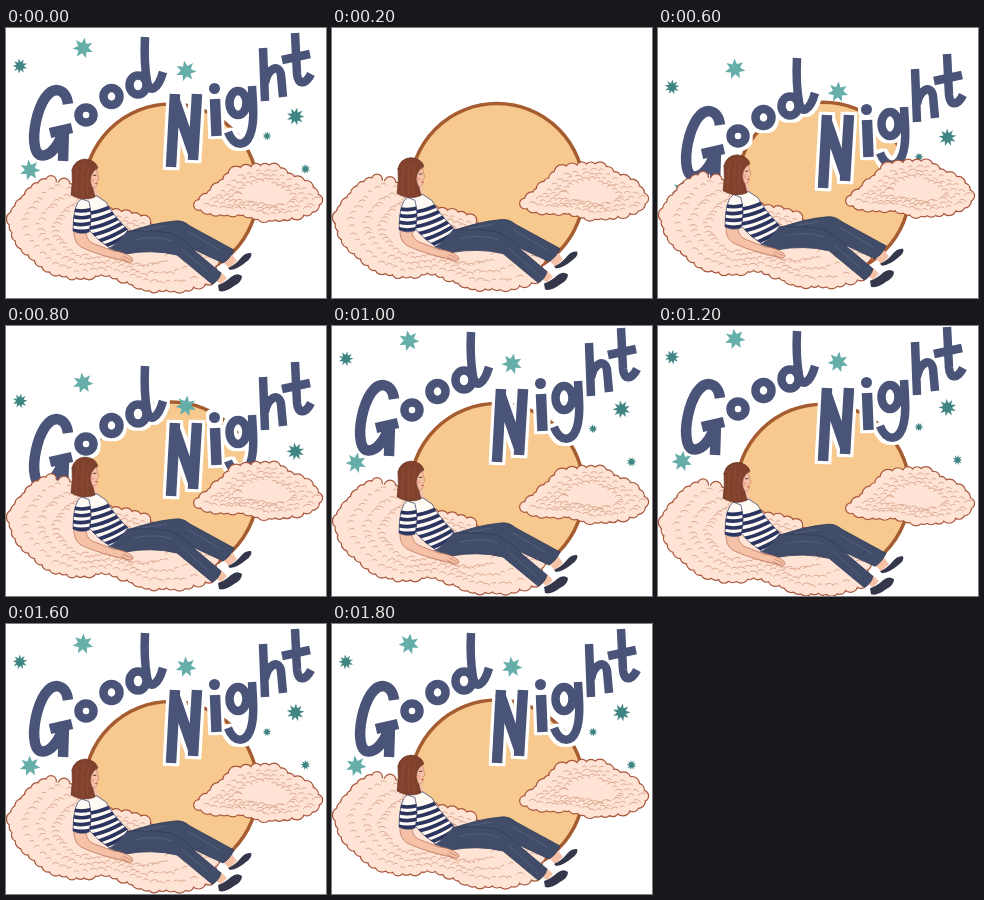
Recreate the animation shown at these times as an HTML page. Size 320 by 270 pixels, loop 2 s.

```html
<!DOCTYPE html>
<html lang="en">
<head>
<meta charset="utf-8">
<title>Good Night</title>
<style>
html, body { margin: 0; width: 100%; height: 100%; overflow: hidden; background: #fff; }
svg { display: block; width: 100vw; height: 100vh; }
path { stroke-linecap: round; stroke-linejoin: round; }
#words path { stroke-linecap: butt; }
</style>
</head>
<body>
<svg id="stage" viewBox="0 0 320 270" role="img" aria-label="Good Night"></svg>
<script>
const stage = document.getElementById('stage');
const shape = (d, fill, extra = '') => `<path d="${d}" fill="${fill}" ${extra}/>`;
const line = (d, color, width) => shape(d, 'none', `stroke="${color}" stroke-width="${width}"`);
const dot = (x, y, r, extra = '') => `<circle cx="${x}" cy="${y}" r="${r}" ${extra}/>`;
const ring = (x, y, rx, ry) =>
  `M${x - rx} ${y}a${rx} ${ry} 0 1 1 ${2 * rx} 0a${rx} ${ry} 0 1 1 ${-2 * rx} 0Z`;

function random(seed) {
  return () => (seed = seed * 16807 % 2147483647) / 2147483647;
}

// Centre lines of the hand lettering, grouped by pen width.
const thick = 'M62 76C60 61 48 57 39 70C31 82 26 105 29 119C32 132 42 128 48 121C54 114 56 108 57 101' +
  'M44 105L66 100M58 100L57 133M169 66L165 139M168 70L188 128M191 66L187 132M209 71L210.500 108';
const thin = ring(80, 87, 7.5, 7.5) + ring(105.5, 68.5, 8, 8.5) + ring(132, 57, 8.5, 9.5) +
  'M139 9C138 30 139 42 141 53C143 66 152 62 157 44' +
  ring(232, 75, 8.5, 12) + 'M246 58C247 76 249 94 244 107C239 119 228 119 222 104' +
  'M257 20L259 73M259 55C262 40 273 35 275 47L277 69' +
  'M289 5L291 46C292 58 300 56 305 46M276 32L304 26';
const lettering = color => line(thick, color, 10.5) + line(thin, color, 8.5) + dot(208.5, 60.5, 5.5, `fill="${color}"`);

// A filled outline with puffs strung along it and loose curls inside.
function cloud(outline, seed) {
  const rnd = random(seed), pts = outline.split(' ').map(p => p.split(',').map(Number));
  const cx = pts.reduce((s, p) => s + p[0], 0) / pts.length;
  const cy = pts.reduce((s, p) => s + p[1], 0) / pts.length;
  let puffs = '', curls = '';
  pts.forEach(([x, y], i) => {
    const [u, v] = pts[(i + 1) % pts.length];
    const n = Math.max(1, Math.round(Math.hypot(u - x, v - y) / 9));
    for (let k = 0; k < n; k++) {
      const px = x + (u - x) * k / n, py = y + (v - y) * k / n, r = 4.8 + 2.6 * rnd();
      puffs += dot(px.toFixed(1), py.toFixed(1), r.toFixed(1));
      for (const depth of [.08, .25, .42]) {
        const s = 2.5 + 3 * rnd(), qx = px + (cx - px) * depth, qy = py + (cy - py) * depth;
        curls += `M${qx.toFixed(1)} ${qy.toFixed(1)}a${s.toFixed(1)} ${s.toFixed(1)} 0 0 1 ${(s * 1.5).toFixed(1)} ${(s * (rnd() - .5)).toFixed(1)}`;
      }
    }
  });
  return `<g fill="#ffe4d6" stroke="#a8553a" stroke-width="2.4">${puffs}</g>` +
    `<g fill="#ffe4d6">${puffs}<polygon points="${outline}"/></g>` + line(curls, '#d39a7e', .8);
}
const bank = '45,153 58,156 68,170 100,186 120,189 138,194 150,212 185,222 206,232 203,250 182,257 ' +
  '148,258 126,251 100,242 66,246 42,238 22,220 12,207 8,191 16,178 31,161';
const drift = '193,177 207,168 217,157 230,146 250,141 268,142 283,151 300,160 311,172 ' +
  '301,182 281,187 258,187 235,181 210,181';

const stars = [
  [14, 38, 7.5], [77, 20, 10.5], [180, 43, 10.5], [289.5, 88.5, 9], [24, 142, 10.5], [261, 108, 4.5], [299.5, 141, 5]
];
function star([x, y, r]) {
  const light = r > 10, n = light ? 7 : 9;
  let d = '';
  for (let i = 0; i < 2 * n; i++) {
    const a = i * Math.PI / n, s = i % 2 ? r * .5 : r;
    d += (i ? 'L' : 'M') + (s * Math.sin(a)).toFixed(2) + ' ' + (-s * Math.cos(a)).toFixed(2);
  }
  return `<g transform="translate(${x} ${y})">${shape(d + 'Z', light ? '#66aeaa' : '#3f8583', 'class="star"')}</g>`;
}

function woman() {
  const navy = '#2b3560', denim = '#414c69', seam = '#303b56', skin = '#f5c2a8', shade = '#b56b52', shoe = '#34374a';
  const denimLeg = d => shape(d, denim, `stroke="${seam}" stroke-width=".8"`);
  const cloth = d => shape(d, '#fffaf4', `stroke="${navy}" stroke-width=".7"`);
  const torso = 'M74 172Q82 167 91 168L100 174Q106 186 122 202Q114 214 104 220Q92 213 84 203L78 190Z';
  const sleeve = 'M75 171Q67 176 67 203Q75 207 83 204Q87 188 83 174Z';
  let bands = '', cuffs = '';
  for (let y = 186; y < 232; y += 7.4) bands += `M72 ${y}Q96 ${y + 1} 126 ${y - 19}`;
  for (let y = 181; y < 204; y += 6.8) cuffs += `M64 ${y}q11 4 23 0`;
  return `<clipPath id="torso"><path d="${torso}"/></clipPath><clipPath id="sleeve"><path d="${sleeve}"/></clipPath>` +
    // far leg and shoe
    shape('M216 233L225 225L231 233L223 240Z', skin) +
    shape('M222 240Q229 237 234 231Q239 224 245 225Q247 229 240 234Q232 241 224 242Z', shoe) +
    denimLeg('M116 206Q145 195 169 193Q177 192 184 198L228 222Q224 231 217 235L176 216L130 218Z') +
    // near leg and shoe
    shape('M207 251L215 244L221 250L215 256Z', skin) +
    shape('M212 257Q220 254 225 249Q231 244 236 248Q236 254 228 258Q219 265 213 263Z', shoe) +
    denimLeg('M103 220Q112 210 121 203Q147 202 164 205Q177 210 190 224L215 245Q213 253 206 256L171 227Q146 221 119 226Z') +
    line('M128 212Q149 207 166 213M176 221L203 245M181 203L215 223M137 202L160 198', '#5a6680', .8) +
    // neck, shirt, arm
    shape('M79 157L90 159L93 170Q86 174 78 169Z', skin) +
    cloth(torso) + `<g clip-path="url(#torso)">${line(bands, navy, 3.8)}</g>` +
    shape('M68 202L80 204Q80 211 86 215L107 223Q119 224 126 230Q129 234 123 234L107 230Q87 225 75 219Q67 214 68 202Z', skin, `stroke="${shade}" stroke-width=".7"`) +
    line('M117 228L125 232M115 230L120 233', shade, .6) +
    cloth(sleeve) + `<g clip-path="url(#sleeve)">${line(cuffs, navy, 3.6)}</g>` +
    // head
    shape('M80 138Q91 137 91 144L93 151L91 153L91 157Q89 162 81 160Z', skin, `stroke="${shade}" stroke-width=".5"`) +
    shape('M66 142Q68 132 79 131Q90 132 92 140Q87 142 85 148Q83 154 87 161L89 169Q78 174 65 167Q67 154 66 142Z', '#80412d', 'stroke="#663021" stroke-width=".6"') +
    line('M72 139Q69 153 70 167M78 136Q75 154 77 169M83 140Q79 151 82 168', '#975238', .7) +
    line('M87.500 147.500l2.500 -.3', '#4a2a28', .9) +
    line('M89.500 155.500l1.500 0', '#c75549', 1) +
    dot(86.5, 152.5, 2, 'fill="#ec9d8a" opacity=".7"');
}

stage.innerHTML =
  '<filter id="grow"><feMorphology operator="dilate" radius="2.6"/></filter>' +
  `<g id="moon">${dot(165, 163, 87, 'fill="#f8c98f" stroke="#a55c30" stroke-width="3.5"')}</g>` +
  `<g id="words"><g filter="url(#grow)">${lettering('#fff')}</g>${lettering('#4a5378')}</g>` +
  `<g id="sky">${stars.map(star).join('')}</g>` +
  `<g id="scene">${cloud(bank, 71)}${cloud(drift, 29)}${woman()}</g>`;

const sparks = [...document.querySelectorAll('.star')];
const lift = (id, y) => document.getElementById(id).setAttribute('transform', `translate(0 ${y.toFixed(2)})`);

// Ten held poses: the scene rises steadily, then dips in an arc.
const bob = i => i < 4 ? -1.4 * i : 5.5 * Math.sin(Math.PI * (i - 4) / 5) ** .6;

// Drops in through the entry heights, sways against the scene, then rests.
function place(i, entry, sway) {
  if (i < 1 || i > 7) return 0;
  return i <= entry.length ? entry[i - 1] : -sway * bob(i);
}

function draw(ms) {
  const i = Math.floor(ms % 2000 / 200);
  lift('words', place(i, [-200, -116, 21, 31], .75));
  lift('sky', place(i, [-200, -170, 21, 37], 1.3));
  lift('scene', bob(i));
  lift('moon', bob(i) * .4);
  const tilt = 10 * Math.cos(Math.PI * i / 5);
  sparks.forEach((s, k) => s.setAttribute('transform', `rotate(${(k % 2 ? tilt : -tilt).toFixed(1)})`));
}

const start = performance.now();
function tick() {
  draw(performance.now() - start);
  requestAnimationFrame(tick);
}
tick();
</script>
</body>
</html>
```
